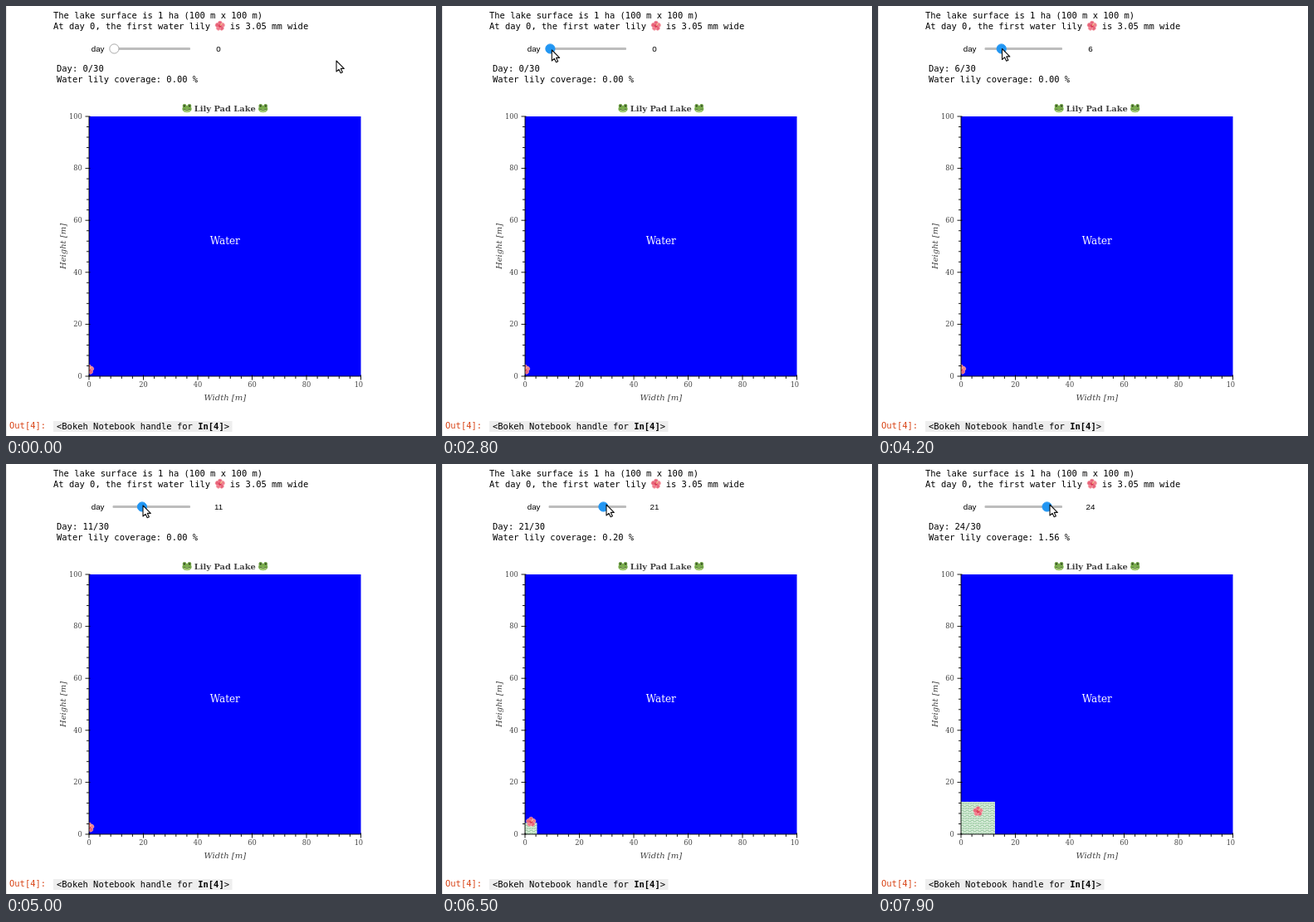
Write an HTML page that moves like this. It is 518x518 px and loops after 8000 ms.

```html
<!DOCTYPE html>
<html lang="en">
<head>
<meta charset="utf-8">
<title>Lily Pad Lake</title>
<style>
  html, body { margin: 0; width: 100%; height: 100%; overflow: hidden; background: #fff; }
  svg { display: block; width: 100vw; height: 100vh; }
  text { white-space: pre; }
  .mono { font: 10.47px "DejaVu Sans Mono", monospace; }
  .sans { font: 9.8px "Liberation Sans", Arial, sans-serif; }
  .serif { font-family: "DejaVu Serif", serif; fill: #444; }
  .title { font-size: 9.9px; font-weight: bold; }
  .axis { font-size: 10px; font-style: italic; }
  .tick { font-size: 8.25px; }
  .mid { text-anchor: middle; }
</style>
</head>
<body>
<svg viewBox="0 0 518 518">
  <defs>
    <pattern id="pads" width="6" height="6" patternUnits="userSpaceOnUse" x="100" y="446">
      <rect width="6" height="6" fill="#d3ead5"/>
      <path d="M0 2Q1.500 0 3 2T6 2M0 5Q1.500 3 3 5T6 5" fill="none" stroke="#79b583" stroke-width=".75"/>
      <path d="M1 3.500h1M4 .5h1" stroke="#f4faf2" stroke-width=".9"/>
    </pattern>
    <clipPath id="plot"><rect x="100" y="133" width="327.500" height="313"/></clipPath>
    <clipPath id="canvas"><rect x="50" y="110" width="380" height="375"/></clipPath>
    <g id="flower">
      <g id="petals"></g>
      <circle r="1.700" fill="#d9304f"/>
      <path d="M0 0L2.600 -3.200" stroke="#f6d98a" stroke-width="1"/>
    </g>
    <g id="frog">
      <circle cx="-3" cy="-2.600" r="2.300" fill="#6c9d45"/>
      <circle cx="3" cy="-2.600" r="2.300" fill="#6c9d45"/>
      <ellipse cy="1" rx="5.700" ry="4.200" fill="#79ad4d"/>
      <ellipse cy="2.900" rx="4" ry="2" fill="#a5cb78"/>
      <circle cx="-3" cy="-2.600" r="1" fill="#29381f"/>
      <circle cx="3" cy="-2.600" r="1" fill="#29381f"/>
      <path d="M-4 1.300Q0 3.600 4 1.300" fill="none" stroke="#42652c" stroke-width=".8"/>
    </g>
  </defs>

  <rect width="518" height="518" fill="#fff"/>
  <path d="M.5 0V518" stroke="#e4e4e4"/>

  <g class="mono">
    <text x="57" y="15">The lake surface is 1 ha (100 m x 100 m)</text>
    <text x="57" y="27.800">At day 0, the first water lily</text>
    <text x="269.700" y="27.800">is 3.05 mm wide</text>
    <text x="61" y="79" id="dayText"></text>
    <text x="61" y="91.700" id="coverText"></text>
    <rect x="57" y="500" width="215.500" height="13" fill="#eee"/>
    <text x="4" y="509" fill="#d84315">Out[4]:</text>
    <text x="61" y="510">&lt;Bokeh Notebook handle for <tspan font-weight="bold">In[4]</tspan>&gt;</text>
  </g>
  <use href="#flower" x="257.800" y="24"/>

  <g class="sans">
    <text x="102.700" y="55.200">day</text>
    <text x="256" y="55.200" class="mid" id="value"></text>
  </g>
  <rect x="128.500" y="50" width="93.500" height="3" rx="1" fill="#bdbdbd"/>
  <circle id="knob" cy="51.500" r="5.600"/>

  <use href="#frog" x="218" y="123"/>
  <use href="#frog" x="309.700" y="123"/>
  <text class="serif title mid" x="263.800" y="126.700">Lily Pad Lake</text>

  <rect x="100" y="133" width="327.500" height="313" fill="#00f"/>
  <g clip-path="url(#plot)">
    <rect id="lily" x="100" fill="url(#pads)"/>
    <use id="bloom" href="#flower"/>
  </g>
  <text class="serif mid" x="263.800" y="286.700" font-size="12" style="fill:#fff">Water</text>

  <g id="axes" clip-path="url(#canvas)">
    <path id="ticks" fill="none" stroke="#000" stroke-width=".9"/>
  </g>
  <text class="serif axis mid" x="263.800" y="475">Width [m]</text>
  <text class="serif axis mid" transform="translate(72 289.500) rotate(-90)">Height [m]</text>

  <path id="cursor" d="M0 0V13L3 10.300L5.200 14.800L7.400 13.800L5.300 9.400H9.300Z"
        fill="#fff" stroke="#111" stroke-width="1.100" stroke-linejoin="round"/>
</svg>

<script>
const LOOP = 8000, STEP = 100;
const LEFT = 100, BOTTOM = 446, SX = 3.275, SY = 3.13;
const KNOB_X = 130.4, KNOB_Y = 51.5, DAY_PX = 3.05;

// Pointer path: time, x, y
const PATH = [
  [400, 398, 66], [700, 352, 71], [1200, 231, 79], [1600, 168, 70],
  [2000, 136, 56], [2300, 133, 53], [2800, 132.3, 53], [3300, 133, 52.5],
  [4200, 149.5, 51.5], [5000, 165, 50], [5800, 180.5, 48.5],
  [6500, 198, 49], [7200, 205, 49], [7400, 206.6, 49], [7900, 207, 49]
];

const $ = id => document.getElementById(id);
const NS = "http://www.w3.org/2000/svg";

function add(parent, tag, attrs, text) {
  const el = document.createElementNS(NS, tag);
  set(el, attrs);
  if (text !== undefined) el.textContent = text;
  return parent.appendChild(el);
}

function set(el, attrs) {
  for (const k in attrs) el.setAttribute(k, attrs[k]);
}

function buildFlower() {
  for (let i = 0; i < 5; i++) {
    add($("petals"), "ellipse", {
      cy: -3.2, rx: 2.6, ry: 2.7, fill: i % 2 ? "#f07c8c" : "#e8637a",
      stroke: "#f7b3b8", "stroke-width": 0.5, transform: `rotate(${i * 72})`
    });
  }
}

function buildAxes() {
  let d = `M${LEFT} 133V${BOTTOM}H427.5`;
  for (let m = 0; m <= 100; m += 4) {
    const x = LEFT + m * SX, y = BOTTOM - m * SY;
    const major = m % 20 === 0;
    const out = major ? 4.5 : 3, inner = major ? 1.5 : 0;
    d += `M${x} ${BOTTOM - inner}V${BOTTOM + out}M${LEFT + inner} ${y}H${LEFT - out}`;
    if (major) {
      add($("axes"), "text", { class: "serif tick mid", x, y: 459.3 }, m);
      add($("axes"), "text", { class: "serif tick", x: 91.7, y: y + 2.7, "text-anchor": "end" }, m);
    }
  }
  set($("ticks"), { d });
}

function pointerAt(t) {
  if (t <= PATH[0][0]) return PATH[0].slice(1);
  for (let i = 1; i < PATH.length; i++) {
    const [t0, x0, y0] = PATH[i - 1], [t1, x1, y1] = PATH[i];
    if (t <= t1) {
      const k = (t - t0) / (t1 - t0);
      return [x0 + (x1 - x0) * k, y0 + (y1 - y0) * k];
    }
  }
  return PATH[PATH.length - 1].slice(1);
}

function render(t) {
  const [px, py] = pointerAt(t);
  const day = t < 2800 ? 0 : Math.round((px - 131) / 3.2);
  const share = 2 ** (day - 30);
  const side = 100 * Math.sqrt(share);
  const w = side * SX, h = side * SY;
  const active = t >= 2800 || Math.hypot(px - KNOB_X, py - KNOB_Y) < 6;

  $("dayText").textContent = `Day: ${day}/30`;
  $("coverText").textContent = `Water lily coverage: ${(share * 100).toFixed(2)} %`;
  $("value").textContent = day;
  set($("knob"), {
    cx: KNOB_X + day * DAY_PX,
    fill: active ? "#2196f3" : "#fff",
    stroke: active ? "#2196f3" : "#a8a8a8"
  });
  set($("lily"), { y: BOTTOM - h, width: w, height: h });
  set($("bloom"), { x: LEFT + w / 2, y: BOTTOM - h / 2 - 8 });
  set($("cursor"), { transform: `translate(${px} ${py})` });
}

buildFlower();
buildAxes();
const start = performance.now();
function tick() {
  const t = (performance.now() - start) % LOOP;
  render(Math.floor(t / STEP) * STEP);
  requestAnimationFrame(tick);
}
tick();
</script>
</body>
</html>
```
